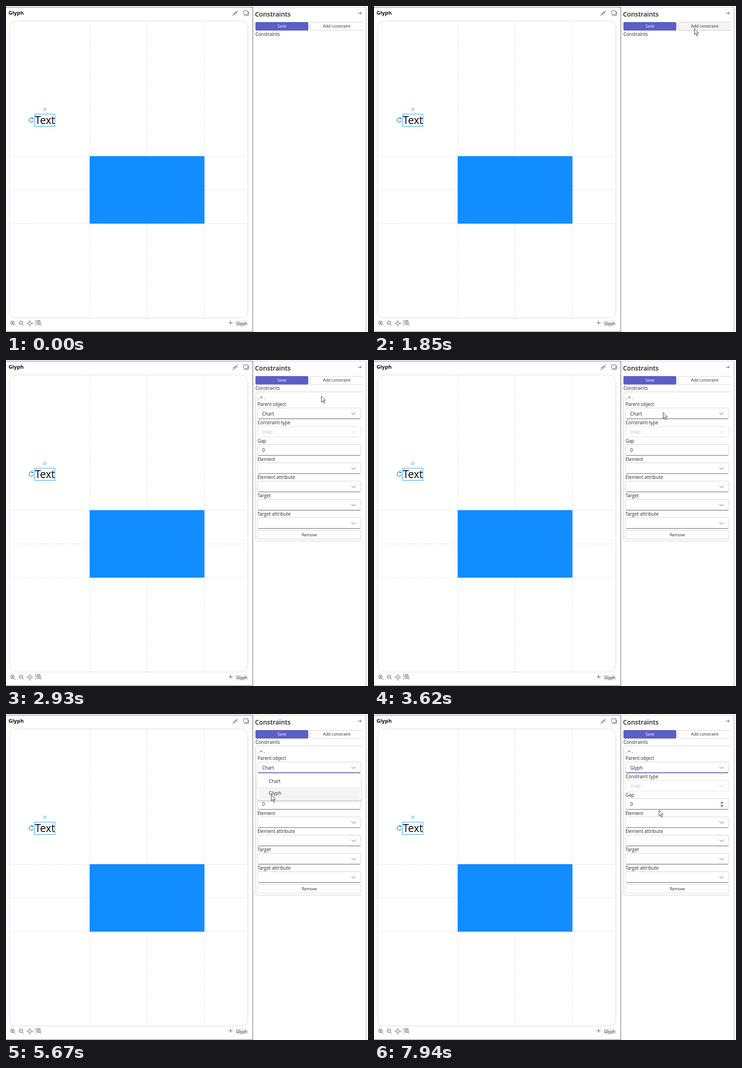
Recreate the animation shown at these times as an HTML page. Size 788 px wide and 710 px high, loop 8 s.

```html
<!DOCTYPE html>
<html lang="en">
<head>
<meta charset="utf-8">
<title>Constraints panel</title>
<style>
  html, body { margin: 0; width: 100%; height: 100%; overflow: hidden; background: #fff; }
  svg { display: block; font: 10px "Open Sans", "Noto Sans", sans-serif; }
  text { fill: #242424; white-space: pre; }
  .small { font-size: 8.8px; }
  .mid { text-anchor: middle; }
  .line, .icon { fill: none; stroke: #d1d1d1; }
  .icon { stroke: #555; }
  .box { fill: #fff; stroke: #d1d1d1; }
  .blue { fill: none; stroke: #2b95f5; }
  .off { fill: #bdbdbd; }
  #add { transition: none; }
</style>
</head>
<body>
<svg width="788" height="710" viewBox="0 0 788 710">
  <defs>
    <clipPath id="panel"><path d="M538 0H777V710H538z"/></clipPath>
    <filter id="shadow" x="-10%" y="-30%" width="120%" height="170%">
      <feDropShadow dx="0" dy="3" stdDeviation="2.5" flood-opacity=".2"/>
    </filter>
  </defs>

  <!-- Frames -->
  <path class="line" d="M538 2.5H784" stroke-width="1"/>
  <path d="M783.8 2V710" stroke="#c4c4c4" stroke-width="1.5"/>
  <path d="M0 2.5H537.2V709.5H0" fill="none" stroke="#777" stroke-width="1.2"/>

  <!-- Editor -->
  <text x="5.5" y="18.7" font-size="11.4" font-weight="700" style="fill:#111">Glyph</text>
  <g class="icon">
    <path d="M505 10L499.5 15.5M499.5 11.5V15.5H503.5M492.500 22L498 16.500M494 16.500H498V20.500"/>
    <rect x="517" y="10.500" width="9.500" height="8" rx="1.500"/>
    <path d="M528.500 12.500V18.500Q528.500 20.800 526 20.800H519"/>
  </g>
  <rect x="7.500" y="32.500" width="519" height="647" rx="15" class="line" style="stroke:#d9d9d9"/>
  <g stroke="#dcdcdc" stroke-dasharray="3 2">
    <path d="M182.500 33V680M431.500 33V680M8 327.500H526M8 400.500H526M8 473.500H526"/>
    <path d="M307 33V680" stroke="#d0d0d0" stroke-dasharray="2 2"/>
  </g>
  <rect x="182" y="327" width="250" height="147" fill="#118dff"/>
  <text x="63" y="257" font-size="23" style="fill:#000">Text</text>
  <g class="blue">
    <rect x="62.500" y="235.500" width="44" height="27"/>
    <circle cx="84.500" cy="225" r="2.700"/>
    <path d="M57.500 244.300A4.800 4.800 0 1 0 59.800 249" stroke-width="1.500"/>
    <path d="M56 241.500L60.800 245.500L55.500 247z" fill="#2b95f5" stroke="none"/>
  </g>

  <!-- Toolbar -->
  <g class="icon">
    <g id="lens"><circle cx="14" cy="690" r="4"/><path d="M17 693L20.500 696.500M12 690H16"/></g>
    <path d="M14 688V692"/>
    <use href="#lens" x="18.500"/>
    <circle cx="52" cy="691" r="3"/>
    <path d="M50 686.500L52 684.500L54 686.500M50 695.500L52 697.500L54 695.500M47.500 689L45.500 691L47.500 693M56.500 689L58.500 691L56.500 693"/>
    <path d="M64 696V685H75" stroke-dasharray="2 1"/>
    <use href="#lens" x="57"/>
    <path d="M71 688V692M484.500 690H493.500M489 685.500V694.500"/>
  </g>
  <rect x="499" y="684" width="28.500" height="14.500" rx="2" fill="#f3f3f3"/>
  <text class="small mid" x="513.300" y="694.700">Glyph</text>

  <!-- Panel -->
  <text x="542" y="22.700" font-size="14" font-weight="600">Constraints</text>
  <path class="icon" d="M766 15.500H773.500M770.500 12.500L773.500 15.500L770.500 18.500"/>
  <rect x="543" y="35" width="115" height="18.500" rx="2.500" fill="#5b5fc7"/>
  <text class="small mid" x="600.500" y="47.400" style="fill:#fff">Save</text>
  <g clip-path="url(#panel)">
    <rect id="add" class="box" x="662.500" y="35.500" width="116" height="17.500" rx="2.500"/>
  </g>
  <text class="small mid" x="720" y="47.400">Add constraint</text>
  <text x="543" y="65.200">Constraints</text>

  <g id="form">
    <g clip-path="url(#panel)"><rect class="line" x="543.500" y="69.500" width="235" height="325" rx="4"/></g>
    <text x="547.500" y="85">. = .</text>
    <g id="fields"></g>
    <rect class="box" x="547.500" y="371.500" width="225" height="18.500" rx="3"/>
    <text class="small mid" x="660.300" y="383.900">Remove</text>
    <path id="focus" stroke="#5b5fc7" stroke-width="1.500"/>
    <g id="spinner">
      <rect x="752.500" y="188" width="9.500" height="17" fill="#f0f0f0"/>
      <path d="M754.500 194.500L757.300 191L760 194.500zM754.500 198.800L757.300 202.300L760 198.800z" fill="#444"/>
    </g>
  </g>

  <g id="menu">
    <rect x="547.500" y="130" width="225" height="57" rx="3" fill="#fff" filter="url(#shadow)"/>
    <rect id="hover" x="551" width="219.500" height="26.500" rx="3" fill="#f4f4f4"/>
    <text x="572" y="149.500">Chart</text>
    <text x="572" y="175.700">Glyph</text>
  </g>

  <path id="cursor" d="M.5 .5V13.300L3.500 10.500L5.700 15.800L7.800 14.900L5.600 9.800H9.700z" fill="#fff" stroke="#222" stroke-width=".9"/>
</svg>

<script>
const LOOP = 8000;
const $ = id => document.getElementById(id);
const show = (id, on) => $(id).setAttribute('visibility', on ? 'visible' : 'hidden');

const labels = ['Parent object', 'Constraint type', 'Gap', 'Element', 'Element attribute', 'Target', 'Target attribute'];
const values = ['Chart', 'snap', '0'];

function field(label, i) {
  const y = 104.5 + i * 39.83;
  const disabled = label === 'Constraint type';
  const chevron = label === 'Gap' ? '' :
    `<path class="icon" d="M752 ${y + 10}l4.500 4.500l4.500 -4.500" ${disabled ? 'style="stroke:#bdbdbd"' : ''}/>`;
  const underline = disabled ? '' : `<path d="M549 ${y + 23.5}H771" stroke="#616161"/>`;
  return `<text x="547.500" y="${y - 4.4}">${label}</text>
    <rect class="box" x="547.500" y="${y}" width="225" height="23.500" rx="3" ${disabled ? 'style="stroke:#e0e0e0"' : ''}/>
    ${underline}<text id="value${i}" x="557.700" y="${y + 16}" ${disabled ? 'class="off"' : ''}>${values[i] || ''}</text>${chevron}`;
}
$('fields').innerHTML = labels.map(field).join('');

// Pointer stops: time, x, y
const stops = [
  [260, 757, 709], [330, 757, 707], [460, 757, 707], [880, 694, 515], [1290, 672, 363],
  [1320, 672, 363], [1600, 690, 140], [1780, 697, 52], [1850, 697, 49], [2120, 697, 47],
  [2460, 697, 47], [2730, 691, 75], [2870, 691, 75], [3620, 629, 114],
  [4630, 629, 114], [5460, 578, 174], [5670, 577, 176],
  [7070, 577, 176], [7330, 609, 200], [7550, 609, 200], [7600, 610, 200],
  [7820, 610, 200], [7940, 620, 209]
];

function pointer(t) {
  const next = stops.findIndex(s => s[0] > t);
  if (next < 0) return stops.at(-1).slice(1);
  const [t0, x0, y0] = stops[Math.max(0, next - 1)];
  const [t1, x1, y1] = stops[next];
  const k = Math.max(0, (t - t0) / (t1 - t0));
  return [x0 + (x1 - x0) * k, y0 + (y1 - y0) * k];
}

function draw(t) {
  const [x, y] = pointer(t);
  show('cursor', t >= 260);
  $('cursor').setAttribute('transform', `translate(${x} ${y})`);

  const pressed = t >= 2200 && t < 2400;
  const over = x > 662 && y > 35 && y < 53;
  $('add').style.fill = pressed ? '#e0e0e0' : over ? '#f5f5f5' : '#fff';
  $('add').style.stroke = pressed ? '#b3b3b3' : over ? '#c7c7c7' : '#d1d1d1';

  show('form', t >= 2200);
  show('spinner', t >= 7200);
  $('value0').textContent = t < 6600 ? 'Chart' : 'Glyph';

  const open = t >= 3950 && t < 6600;
  show('menu', open);
  show('hover', open && y > 132);
  $('hover').setAttribute('y', y < 158.5 ? 132 : 158.5);

  const half = 111 * Math.min(1, Math.max(0, (t - 3900) / 240));
  show('focus', half > 0);
  $('focus').setAttribute('d', `M${660 - half} 128H${660 + half}`);
}

function tick() {
  draw(performance.now() % LOOP);
  requestAnimationFrame(tick);
}
tick();
</script>
</body>
</html>
```
